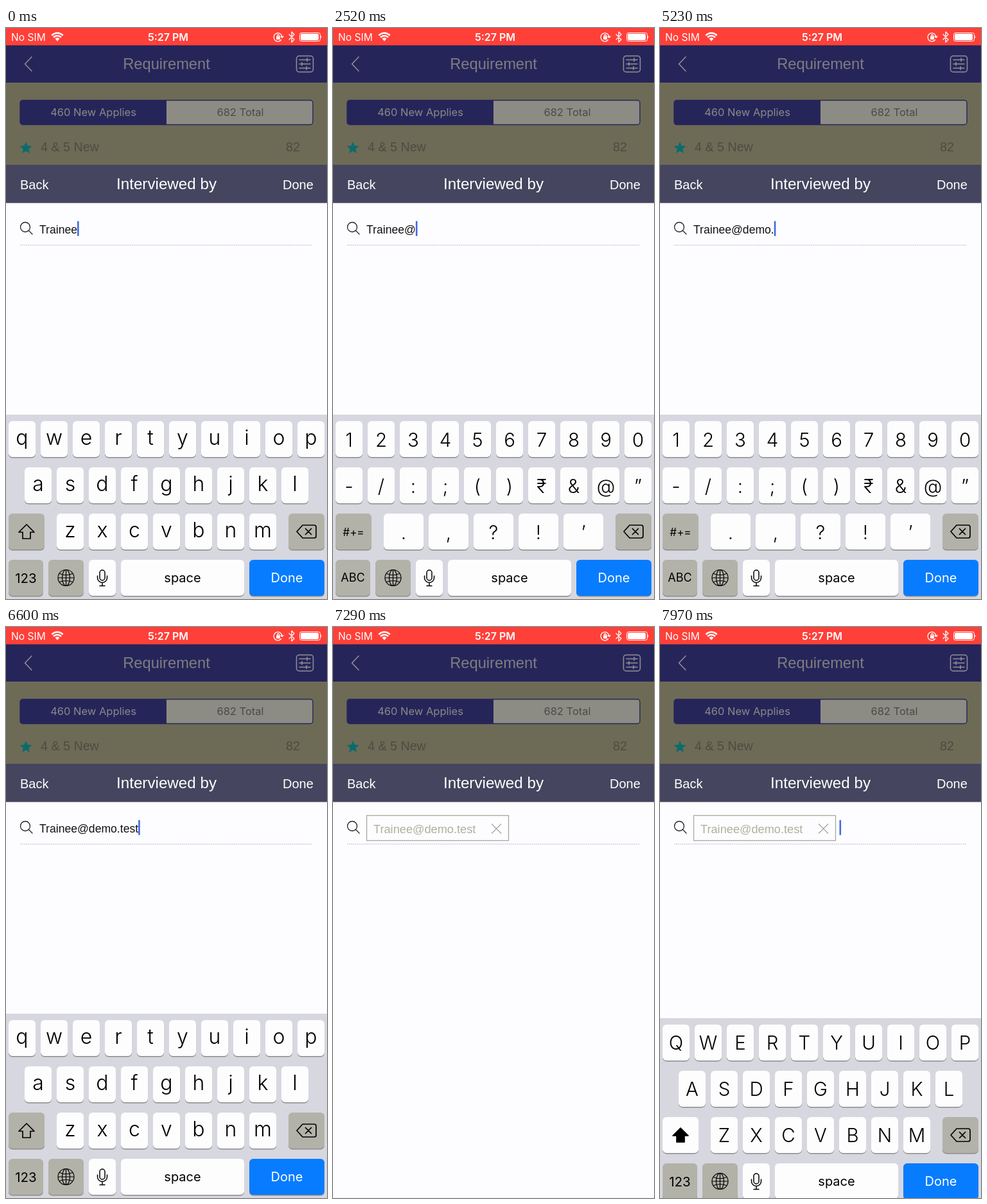
Recreate the animation shown at these times as an HTML page. Size 500x889 px, loop 7990 ms.

```html
<!DOCTYPE html>
<html lang="en">
<head>
<meta charset="utf-8">
<title>Interviewed by</title>
<style>
  html, body { margin: 0; width: 100%; height: 100%; overflow: hidden; background: #fdfdff; }
  svg { display: block; width: 100%; height: 100%; }
  text { font-family: "Liberation Sans", Arial, sans-serif; white-space: pre; }
  .ui { font-family: Inter, Roboto, sans-serif; }
  .mid { text-anchor: middle; }
  .line { fill: none; stroke-linecap: round; stroke-linejoin: round; }
</style>
</head>
<body>
<svg id="stage" viewBox="0 0 500 889">
  <rect width="500" height="889" fill="#fdfdff"/>

  <!-- status bar -->
  <rect width="500" height="27" fill="#ff4039"/>
  <g fill="#fff">
    <text class="ui" x="8" y="20" font-size="15.6">No SIM</text>
    <text class="ui mid" x="252.5" y="20" font-size="16" font-weight="600">5:27 PM</text>
    <path d="M76.5 16.5 80 20.5 83.5 16.5Q80 13.5 76.5 16.5Z"/>
    <rect x="459" y="9" width="28" height="10" rx="2"/>
    <path d="M490.5 11.5q2 2.5 0 5z"/>
    <rect x="421" y="13" width="6" height="5" rx="1"/>
  </g>
  <g class="line" stroke="#fff">
    <path d="M74 14.5q6-5 12 0M71.3 11.5q8.7-7.5 17.4 0" stroke-width="2.6" stroke-linecap="butt"/>
    <rect x="457.5" y="7.5" width="32" height="13" rx="3" stroke-width="1"/>
    <path d="M428.5 18.5a6.5 6.5 0 1 1 1.5-4.5M428 13l2 2 2-2M422.5 13v-1a1.5 1.5 0 0 1 3 0v1" stroke-width="1.3"/>
    <path d="M441 10l8 8-4 4V6l4 4-8 8" stroke-width="1.3"/>
  </g>

  <!-- dimmed page -->
  <rect y="27" width="500" height="58" fill="#26255a"/>
  <rect y="85" width="500" height="128" fill="#6d6b56"/>
  <text class="mid" x="250" y="64" font-size="23.7" fill="#7e7e80">Requirement</text>
  <g class="line" stroke="#929294" stroke-width="1.5">
    <path d="M40 45 29.5 56 40 67"/>
    <rect x="452.5" y="43.5" width="26" height="25" rx="4"/>
    <path d="M457 49.5h17M457 56h17M457 62.5h17M469 47v5M461 53.5v5M468 60v5"/>
  </g>
  <rect x="22" y="112.5" width="456" height="38" rx="4" fill="#8d8c84"/>
  <path d="M250 112.5H26a4 4 0 0 0-4 4v30a4 4 0 0 0 4 4H250z" fill="#26255a"/>
  <rect x="22" y="112.5" width="456" height="38" rx="4" fill="none" stroke="#26255a" stroke-width="1.4"/>
  <g class="ui">
    <text class="ui mid" x="136" y="137" font-size="16.5" fill="#8a8a86">460 New Applies</text>
    <text class="ui mid" x="365" y="137" font-size="16.5" fill="#4b4a45">682 Total</text>
  </g>
  <path id="star" fill="#0c6b6c"/>
  <g fill="#4d4c42" font-size="19.7">
    <text x="54" y="192">4 &amp; 5 New</text>
    <text x="436" y="192">82</text>
  </g>

  <!-- search panel -->
  <rect y="213" width="500" height="59.5" fill="#46455f"/>
  <g fill="#fff" font-size="20">
    <text x="22" y="251">Back</text>
    <text class="mid" x="250" y="251" font-size="24.2">Interviewed by</text>
    <text x="431" y="251">Done</text>
  </g>
  <g class="line" stroke="#222" stroke-width="1.3">
    <circle cx="30" cy="310" r="7.5"/>
    <path d="M35.5 315.5 41 321"/>
  </g>
  <path d="M22 338H478" stroke="#b9b6d8" stroke-dasharray="2 1"/>
  <text id="query" x="52" y="319.5" font-size="17.6" fill="#111"></text>
  <g id="chip">
    <rect x="52.5" y="293.5" width="221" height="39" fill="none" stroke="#a8a89c" stroke-width="1.3"/>
    <text x="63" y="321" font-size="18.2" fill="#b0b09c"></text>
    <path d="M247 306.5l15 15m0-15-15 15" stroke="#a0a092" stroke-width="1.2"/>
  </g>
  <rect id="caret" y="300.5" width="2.6" height="23.5" rx="1" fill="#4169e6"/>
  <circle id="loader" cx="249" cy="446" r="28" fill="#1c79b0"/>

  <g id="keyboard"><rect y="602" width="500" height="287" fill="#d7d7e0"/></g>
</svg>

<script>
const LOOP = 7990;
const ADDRESS = 'Trainee@demo.test';
const START_LENGTH = 7;
const KEY_TIMES = [2000, 3420, 3680, 3900, 4200, 5150, 5760, 5920, 6080, 6240];
const MODES = [[0, 'letters'], [520, 'symbols'], [2750, 'letters'],
               [4880, 'symbols'], [5360, 'letters'], [7410, 'capitals']];
const KEYBOARD_HEIGHT = 287, HIDE_AT = 6830, SHOW_AT = 7410;
const ROWS = [612, 684, 756, 828];
const GREY = '#b2b2a9', WHITE = '#fdfdfe';

const $ = id => document.getElementById(id);
const clamp = v => Math.max(0, Math.min(1, v));

function add(parent, tag, attrs, content = '') {
  const el = document.createElementNS($('stage').namespaceURI, tag);
  for (const name in attrs) el.setAttribute(name, attrs[name]);
  el.textContent = content;
  parent.append(el);
  return el;
}

function addKey(parent, x, row, width, fill, label = '', size = 30, drop = 40, color = '#000', weight = 400) {
  const y = ROWS[row];
  const box = { x, width, height: 56, rx: 6 };
  add(parent, 'rect', { ...box, y: y + 1.4, fill: '#8c8c8b' });
  add(parent, 'rect', { ...box, y, fill });
  add(parent, 'text', { class: 'ui mid', x: x + width / 2, y: y + drop,
    'font-size': size, 'font-weight': weight, fill: color }, label);
}

function addIcon(parent, d, width = 1.7, fill = 'none') {
  add(parent, 'path', { class: 'line', d, stroke: '#000', 'stroke-width': width, style: `fill:${fill}` });
}

function addLayout(name) {
  const layer = add($('keyboard'), 'g', {});
  const symbols = name === 'symbols', capitals = name === 'capitals';
  const style = name === 'letters' ? [32, 37, '#000', 300] : [29.5, 39.5, '#000', 330];
  const addRow = (keys, row, x, step = 50) => [...keys].forEach((key, i) =>
    addKey(layer, x + i * step, row, step - 8, WHITE, key, ...style));

  if (symbols) {
    addRow('1234567890', 0, 4);
    addRow('-/:;()₹&@”', 1, 4);
    addRow('.,?!’', 2, 79, 70);
    addKey(layer, 4, 2, 56, GREY, '#+=', 17, 35);
    addKey(layer, 4, 3, 54, GREY, 'ABC', 18, 34);
  } else {
    const cased = s => capitals ? s.toUpperCase() : s;
    addRow(cased('qwertyuiop'), 0, 4);
    addRow(cased('asdfghjkl'), 1, 29);
    addRow(cased('zxcvbnm'), 2, 79);
    addKey(layer, 4, 2, 56, capitals ? WHITE : GREY);
    addIcon(layer, 'M32 773 44 785H38V795H26V785H20Z', 1.7, capitals ? '#000' : 'none');
    addKey(layer, 4, 3, 54, GREY, '123', 20.5, 36);
  }
  return layer;
}

function buildSharedKeys() {
  const board = $('keyboard');
  addKey(board, 440, 2, 56, GREY);
  addIcon(board, 'M453 784 462 774H480Q483 774 483 777V791Q483 794 480 794H462ZM466.5 779.5l9 9m0-9-9 9');
  addKey(board, 66, 3, 55, GREY);
  addIcon(board, 'M81 856a12.5 12.5 0 1 0 25 0a12.5 12.5 0 1 0-25 0ZM87.5 856a6 12.5 0 1 0 12 0a6 12.5 0 1 0-12 0Z' +
    'M93.5 843.5v25M81 856h25M83.5 849.5q10 4 20 0M83.5 862.5q10-4 20 0', 1.2);
  addKey(board, 129, 3, 42, WHITE);
  addIcon(board, 'M146 848a4 4 0 0 1 8 0v8a4 4 0 0 1-8 0ZM142.5 853v3a7.5 7.5 0 0 0 15 0v-3M150 863.5v5M146 868.5h8', 1.5);
  addKey(board, 179, 3, 192, WHITE, 'space', 20, 35);
  addKey(board, 379, 3, 117, '#087cff', 'Done', 20, 35, '#fff');
}

function starPath(cx, cy, radius) {
  const points = Array.from({ length: 10 }, (_, i) => {
    const angle = i * Math.PI / 5 - Math.PI / 2, r = i % 2 ? radius * .45 : radius;
    return [cx + r * Math.cos(angle), cy + r * Math.sin(angle)];
  });
  return `M${points.join('L')}Z`;
}

function keyboardOffset(t) {
  if (t < HIDE_AT) return 0;
  if (t < SHOW_AT) return KEYBOARD_HEIGHT * (1 - Math.exp(-(t - HIDE_AT) / 69));
  return KEYBOARD_HEIGHT * Math.exp(-1.487 * ((t - SHOW_AT) / 140) ** .66);
}

function caretOpacity(t) {
  if (t >= HIDE_AT && t < SHOW_AT) return 0;
  return 1 - clamp((t - 450) / 150) + clamp((t - 730) / 150);
}

const show = (el, visible) => { el.style.display = visible ? '' : 'none'; };

$('star').setAttribute('d', starPath(31, 187, 10));
$('chip').querySelector('text').textContent = ADDRESS;
buildSharedKeys();
const layouts = Object.fromEntries(['letters', 'symbols', 'capitals'].map(name => [name, addLayout(name)]));

function draw(t) {
  const submitted = t >= HIDE_AT;
  const typed = KEY_TIMES.filter(time => time <= t).length;
  const query = $('query');
  query.textContent = submitted ? '' : ADDRESS.slice(0, START_LENGTH + typed);
  $('caret').setAttribute('x', submitted ? 279.5 : 52 + query.getComputedTextLength());
  $('caret').setAttribute('opacity', caretOpacity(t));
  show($('chip'), submitted);
  show($('loader'), t >= 1120 && t < 1820);

  const mode = MODES.filter(([time]) => time <= t).pop()[1];
  for (const name in layouts) show(layouts[name], name === mode);
  $('keyboard').setAttribute('transform', `translate(0 ${keyboardOffset(t)})`);
}

const start = performance.now();
function tick() {
  draw((performance.now() - start) % LOOP);
  requestAnimationFrame(tick);
}
tick();
</script>
</body>
</html>
```
